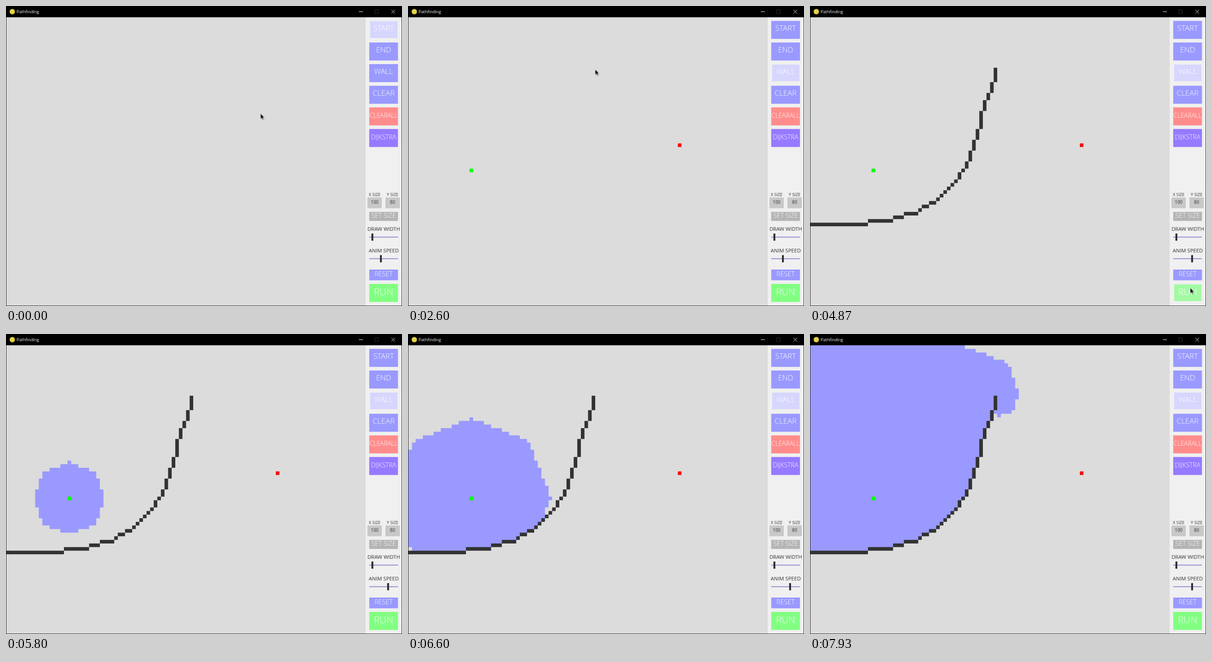
Animation, 861 px wide and 650 px high, one loop 8 s. Source, as an HTML page with a canvas:

```html
<!DOCTYPE html>
<html lang="en">
<head>
<meta charset="utf-8">
<title>Pathfinding</title>
<style>
  html, body { margin: 0; width: 100%; height: 100%; overflow: hidden; background: #000; }
  canvas { display: block; width: 861px; height: 650px; }
</style>
</head>
<body>
<!-- The window is laid out on whole pixels at 882 x 666 and shown slightly smaller. -->
<canvas id="stage" width="882" height="666"></canvas>
<script>
const ctx = document.getElementById('stage').getContext('2d');
const LOOP = 8000, STEP = 1000 / 15;
const COLS = 100, ROWS = 80, CELL = 8, LEFT = 1, TOP = 25;
const START = [17, 42], END = [75, 35];
const DARK = '#323232', LILAC = '#9999ff', PALE = '#d6d6ff';

// Times in ms of the clicks, and steady rates in cells per ms.
const PICK_END = 1330, PICK_WALL = 2330, DRAW_AT = 2620, RUN_AT = 5533, HIDE_AT = 5730;
const DRAW_RATE = .0715, SEARCH_RATE = 72.5 / STEP;

const lerp = (a, b, p) => a.map((v, i) => v + (b[i] - v) * p);
const smooth = p => p * p * (3 - 2 * p);
const centre = ([c, r]) => [LEFT + (c + .5) * CELL, TOP + (r + .5) * CELL];

// Stroke of the pen in grid units, stepped one cell at a time along its longer axis.
function traceWall() {
  const bends = [
    [51.4, 14], [50.62, 17], [47.3, 26], [46.55, 30], [43.6, 39], [41.45, 43],
    [34, 50.8], [29, 53.6], [22, 55.6], [15, 56.6], [0, 57]
  ];
  const cells = [bends[0].map(Math.round)];
  for (let i = 1; i < bends.length; i++) {
    const [a, b] = [bends[i - 1], bends[i]];
    const n = Math.round(Math.max(Math.abs(b[0] - a[0]), Math.abs(b[1] - a[1])));
    for (let k = 1; k <= n; k++) cells.push(lerp(a, b, k / n).map(Math.round));
  }
  return cells;
}

// Dijkstra with costs 10 and 14; returns cells in the order they are settled.
function searchOrder(wall, limit) {
  const key = (c, r) => r * COLS + c;
  const blocked = new Set(wall.map(([c, r]) => key(c, r)));
  const best = new Map([[key(...START), 0]]), done = new Set();
  const buckets = [[START]], order = [];
  for (let d = 0; d < buckets.length && order.length < limit; d++) {
    for (const [c, r] of buckets[d] || []) {
      if (done.has(key(c, r))) continue;
      done.add(key(c, r));
      order.push([c, r]);
      for (let dy = -1; dy <= 1; dy++) for (let dx = -1; dx <= 1; dx++) {
        const x = c + dx, y = r + dy, k = key(x, y);
        if (x < 0 || y < 0 || x >= COLS || y >= ROWS || blocked.has(k)) continue;
        if (dx && dy && blocked.has(key(x, r)) && blocked.has(key(c, y))) continue;
        const cost = d + (dx && dy ? 14 : 10);
        if (cost >= (best.get(k) ?? Infinity)) continue;
        best.set(k, cost);
        (buckets[cost] ||= []).push([x, y]);
      }
    }
  }
  return order;
}

const wall = traceWall();
const visited = searchOrder(wall, 2700);
const built = t => Math.max(0, Math.min(wall.length, Math.round((t - DRAW_AT) * DRAW_RATE)));
const settled = t => Math.max(0, Math.round((t - RUN_AT) * SEARCH_RATE));
const drawEnd = DRAW_AT + wall.length / DRAW_RATE;

// Places the pointer visits, each with its time of arrival.
const stops = [
  [0, 567, 239], [200, 177, 312], [620, ...centre(START)],
  [1270, 841, 97], [1533, 643, 187], [1930, ...centre(END)],
  [2267, 841, 146], [DRAW_AT, ...centre(wall[0])],
  [drawEnd, ...centre(wall[wall.length - 1])], [3730, 22, 477],
  [4333, 835, 561], [4533, 851, 561], [4770, 846, 626], [5667, 862, 629]
];

function mouseAt(t) {
  if (t > DRAW_AT && t < drawEnd) {
    const [x, y] = centre(wall[Math.max(0, built(t) - 1)]);
    return [x - 1, y + 3];
  }
  const i = stops.findIndex(stop => stop[0] > t);
  if (i < 0) return stops[stops.length - 1].slice(1);
  const [a, b] = [stops[i - 1], stops[i]];
  return lerp(a.slice(1), b.slice(1), smooth((t - a[0]) / (b[0] - a[0])));
}

function rect(color, x, y, w, h) {
  ctx.fillStyle = color;
  ctx.fillRect(x, y, w, h);
}

function cell([c, r], color) {
  rect(color, LEFT + c * CELL, TOP + r * CELL, CELL, CELL);
}

function label(text, x, middle, size, color = '#fff', weight = 300) {
  ctx.font = `${weight} ${size}px "Open Sans", "Noto Sans", sans-serif`;
  ctx.textAlign = 'center';
  ctx.fillStyle = color;
  ctx.fillText(text, x, middle + size * .357);
}

function button(text, y, h, size, drop, color, mouse, selected) {
  const hover = mouse && Math.abs(mouse[0] - 841) < 32 && mouse[1] > y && mouse[1] < y + h;
  ctx.globalAlpha = hover && !selected ? .7 : 1;
  if (hover || selected) rect(selected ? PALE : color, 811, y + 1, 61, h - 3);
  else rect(color, 809, y, 64, h);
  ctx.globalAlpha = 1;
  label(text, 841, y + drop - (selected ? .5 : 0), size);
}

function slider(text, y, knob) {
  label(text, 841.3, y - 18.5, 11.5, DARK, 400);
  rect('#968cd2', 809, y - 1, 64, 2);
  rect('#282828', knob - 2, y - 8, 4, 16);
}

function sizeBox(text, value, x) {
  label(text, x + 16, 418.5, 9.4, DARK, 400);
  rect('#c8c8c8', x, 425, 32, 24);
  label(value, x + 16, 435.4, 9.9, DARK, 400);
}

function titleBar() {
  ctx.fillStyle = '#e6d24a';
  ctx.beginPath();
  ctx.arc(14, 12.5, 6, 0, 7);
  ctx.fill();
  label('Pathfinding', 48.6, 12.8, 9.4, '#fff', 400);
  rect('#fff', 786, 12, 9, 1);
  ctx.lineWidth = 1;
  ctx.strokeStyle = '#333';
  ctx.strokeRect(821.5, 8.5, 8, 8);
  ctx.strokeStyle = '#fff';
  ctx.stroke(new Path2D('M858.5 8.5l8 8m0-8l-8 8'));
}

function panel(t, mouse) {
  rect('#f0f0f0', 801, 25, 80, 640);
  const tool = t < PICK_END ? 0 : t < PICK_WALL ? 1 : 2;
  ['START', 'END', 'WALL', 'CLEAR'].forEach((text, i) =>
    button(text, 33 + i * 48, 40, 17, 16.3, LILAC, mouse, i === tool));
  button('CLEARALL', 225, 40, 13.9, 17.8, '#ff8c8c', mouse);
  button('DIJKSTRA', 273, 40, 14.1, 18, '#967aff', mouse);
  sizeBox('X SIZE', '100', 805);
  sizeBox('Y SIZE', '80', 845);
  button('SET SIZE', 457, 20, 14.4, 7.6, '#b4b4b4', mouse);
  slider('DRAW WIDTH', 513, 816);
  const drag = Math.max(0, Math.min(1, (t - 4333) / 200));
  slider('ANIM SPEED', 561, 835 + 16 * smooth(drag));
  button('RESET', 585, 24, 14.5, 9.8, LILAC, mouse);
  button('RUN', 617, 40, 21, 17.2, '#82ff82', mouse);
}

function pointer([x, y]) {
  ctx.save();
  ctx.translate(Math.round(x), Math.round(y));
  const arrow = new Path2D('M0 0V11.5L2.6 9.1 4.4 13 6.2 12.2 4.5 8.4H8Z');
  ctx.shadowColor = 'rgba(0,0,0,.3)';
  ctx.shadowBlur = 2;
  ctx.shadowOffsetX = ctx.shadowOffsetY = 1.5;
  ctx.fillStyle = '#000';
  ctx.fill(arrow);
  ctx.shadowColor = 'transparent';
  ctx.strokeStyle = '#ddd';
  ctx.lineWidth = .7;
  ctx.stroke(arrow);
  ctx.restore();
}

function draw(t) {
  const mouse = mouseAt(t);
  rect('#262626', 0, 0, 882, 666);
  rect('#000', 0, 0, 882, 25);
  rect('#dcdcdc', 1, 25, 800, 640);
  titleBar();
  for (const c of visited.slice(0, settled(t))) cell(c, LILAC);
  for (const c of wall.slice(0, built(t))) cell(c, DARK);
  if (t >= 620) cell(START, '#00ff00');
  if (t >= 1930) cell(END, '#ff0000');
  panel(t, t < RUN_AT && mouse);
  if (t < HIDE_AT) pointer(mouse);
}

let shown = -1;
function tick() {
  const frame = Math.floor(((performance.now() + 4) % LOOP) / STEP);
  if (frame !== shown) draw((shown = frame) * STEP);
  requestAnimationFrame(tick);
}
tick();
</script>
</body>
</html>
```
